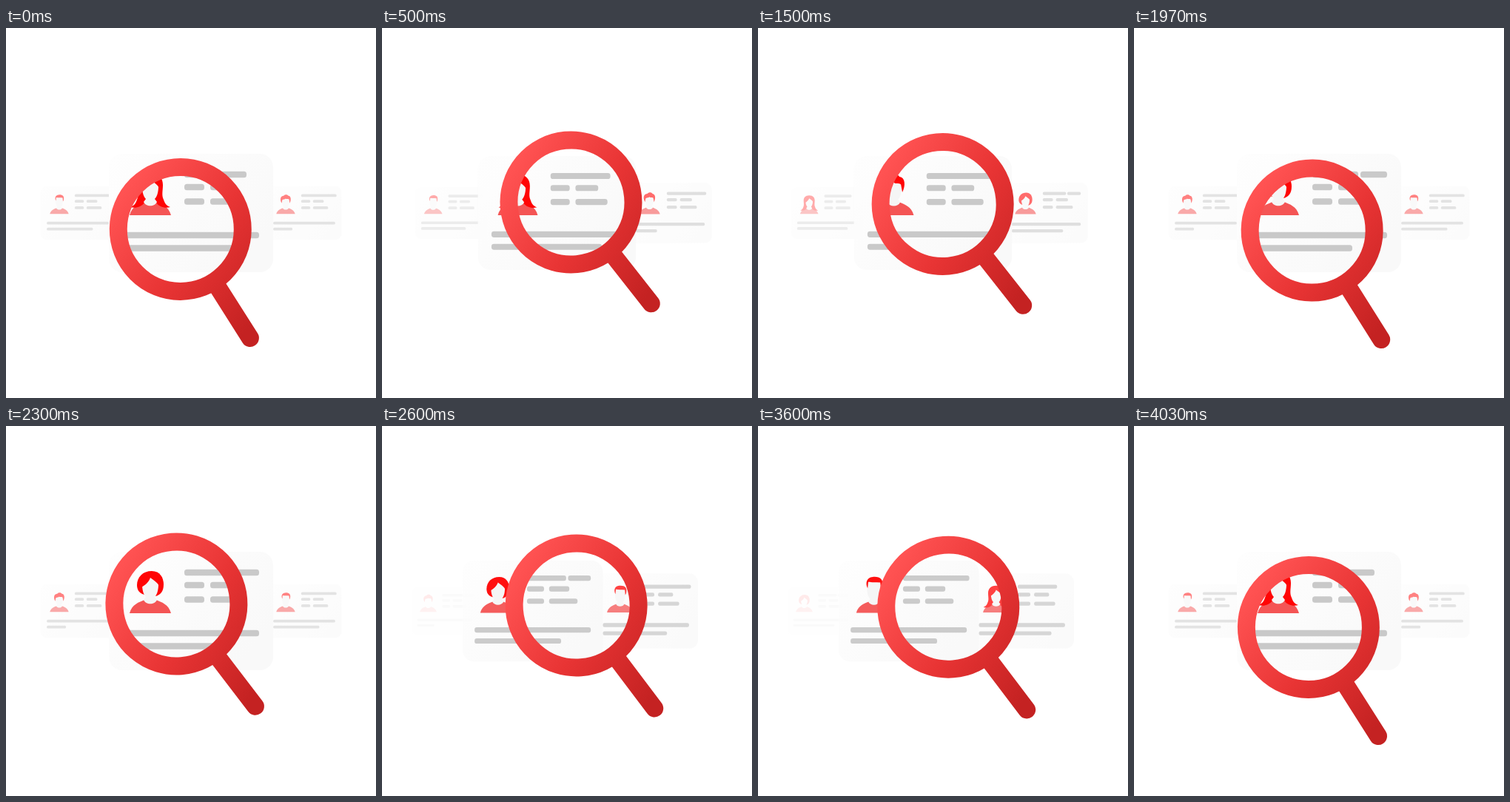
An HTML page for the animation above (4.07 s loop, 500 px wide and 500 px high).

```html
<!DOCTYPE html>
<html lang="en">
<head>
<meta charset="utf-8">
<title>Profile search</title>
<style>
  html, body { margin: 0; width: 100%; height: 100%; overflow: hidden; background: #fff; }
  svg { display: block; width: 100%; height: 100%; }
  .bar { fill: #c9c9c9; }
  .hair { fill: #ff0505; }
  .bust { fill: #f45555; }
  .skin { fill: #f5f5f5; }
</style>
</head>
<body>
<svg viewBox="0 0 500 500">
  <defs>
    <linearGradient id="paper" x1="0" y1="0" x2="1" y2="0.6">
      <stop offset="0" stop-color="#fefefe"/>
      <stop offset="1" stop-color="#f9f9f9"/>
    </linearGradient>
    <linearGradient id="red" gradientUnits="userSpaceOnUse" x1="-84" y1="-40" x2="110" y2="110">
      <stop offset="0" stop-color="#ff5252"/>
      <stop offset="0.5" stop-color="#e83434"/>
      <stop offset="1" stop-color="#c42222"/>
    </linearGradient>
  </defs>
  <g id="deck"></g>
  <g id="loupe" fill="none" stroke="url(#red)" stroke-width="24" stroke-linecap="round">
    <circle r="84"/>
    <path d="M48 73.5L95 146.5"/>
  </g>
</svg>
<script>
const LOOP = 4070, STEP = 1000, ORBIT = 4030;
const deck = document.getElementById('deck');
const loupe = document.getElementById('loupe');

const bust = '<path class="bust" d="M-28 3C-25 -9 -15 -12 -8 -15L8 -15C15 -12 25 -9 28 3Z"/>';
const face = '<path class="skin" d="M-11 -36C-11 -54 11 -54 11 -36C11 -28 9 -22 6 -19L9 -15C6 -8 -6 -8 -9 -15L-6 -19C-9 -22 -11 -28 -11 -36Z"/>';
const hair = d => `<path class="hair" d="${d}"/>`;

const locks = hair('M0 -54C12 -54 17 -47 17 -38C17 -30 15 -24 18 -18C20 -12 22 -10 27 -8C20 -6 12 -8 8 -14L-8 -14C-12 -8 -20 -6 -27 -8C-22 -10 -20 -12 -18 -18C-15 -24 -17 -30 -17 -38C-17 -47 -12 -54 0 -54Z');
const bob = hair('M2 -54C13 -54 18 -45 18 -36C18 -27 14 -21 6 -20L-8 -22C-16 -24 -18 -30 -18 -35C-18 -46 -10 -54 2 -54Z');
const fringe = hair('M-12 -32C-7 -35 -2 -39 0 -45C4 -42 9 -39 12 -34C15 -58 -15 -58 -12 -32Z');
const crop = hair('M-10 -36C-14 -44 -12 -53 -2 -54C9 -55 16 -51 13 -38L11 -34L10 -45C3 -46 -4 -45 -9 -46Z');
const curls = hair('M-12 -29C-19 -42 -14 -51 -6 -51C-2 -56 6 -55 8 -51C16 -50 17 -39 12 -29L10 -40C6 -43 3 -40 0 -43C-3 -40 -6 -42 -10 -39Z');

// Each person: portrait, first-row bars, end of the last line
const people = [
  [bust + locks + face + fringe, [[-9, 75]], 63],
  [bust + face + curls, [[-9, 96]], -35],
  [bob + bust + face + fringe, [[-9, 53], [56, 92]], 45],
  [bust + face + crop, [[-9, 96]], 45]
];

const bar = (y, [x0, x1]) =>
  `<rect class="bar" x="${x0}" y="${y - 4.2}" width="${x1 - x0}" height="8.4" rx="3.5"/>`;

const cards = people.map(([portrait, title, end]) => {
  const g = document.createElementNS('http://www.w3.org/2000/svg', 'g');
  g.innerHTML = '<rect x="-111" y="-80" width="222" height="160" rx="18" fill="url(#paper)"/>' +
    `<g transform="translate(-55 0)">${portrait}</g>` +
    title.map(span => bar(-52, span)).join('') +
    bar(-35, [-9, 18]) + bar(-35, [26, 58]) +
    bar(-15.5, [-9, 18]) + bar(-15.5, [26, 71]) +
    bar(30, [-92, 92]) + bar(47.5, [-92, end]);
  return deck.appendChild(g);
});

const mix = (a, b, p) => a + (b - a) * p;
const clamp = v => Math.min(1, Math.max(0, v));

// Card centres in order of travel: waiting, right, middle, left, gone
const slots = [430, 403, 250, 97, 57];

function drawCards(t) {
  const step = Math.floor(t / STEP);
  const u = clamp((t / STEP - step - 0.4) / 0.55);
  const p = u * u * (3 - 2 * u);
  const placed = cards.map((el, i) => {
    const from = [2, 1, 0, 3][(i - step % 4 + 4) % 4];
    const x = mix(slots[from], slots[from + 1], p);
    const depth = Math.abs(x - 250) / 153;
    const scale = 1 - 0.545 * depth ** 1.1;
    const alpha = from === 0 ? 0.5 * clamp((p - 0.4) / 0.6)
      : from === 3 ? 0.5 * clamp(1 - p / 0.5) ** 2
      : 1 - 0.5 * depth ** 2;
    el.setAttribute('transform', `translate(${x} 250) scale(${scale})`);
    el.setAttribute('opacity', alpha);
    return { el, scale, from };
  });
  placed.sort((a, b) => a.scale - b.scale || a.from - b.from)
    .forEach(({ el }, i) => {
      if (deck.children[i] !== el) deck.insertBefore(el, deck.children[i]);
    });
}

function drawLoupe(t) {
  const rad = Math.PI / 180;
  const turn = Math.min(t, ORBIT) / ORBIT * 1440 * rad;
  const a = 23 * rad + turn + 3.5 * rad * (1 - Math.cos(turn));
  // Every other round swings a little wider
  const sway = Math.sin(turn / 2);
  const x = 243.5 - 19.5 * Math.sin(a) + 2.5 * sway;
  const y = 254 + 19.5 * Math.cos(a) - 1.5 * sway;
  const tilt = -2.6 + 3.2 * Math.cos(a);
  loupe.setAttribute('transform', `translate(${x} ${y}) rotate(${tilt})`);
}

const start = performance.now();
function frame() {
  const t = (performance.now() - start) % LOOP;
  drawCards(t);
  drawLoupe(t);
  requestAnimationFrame(frame);
}
frame();
</script>
</body>
</html>
```
